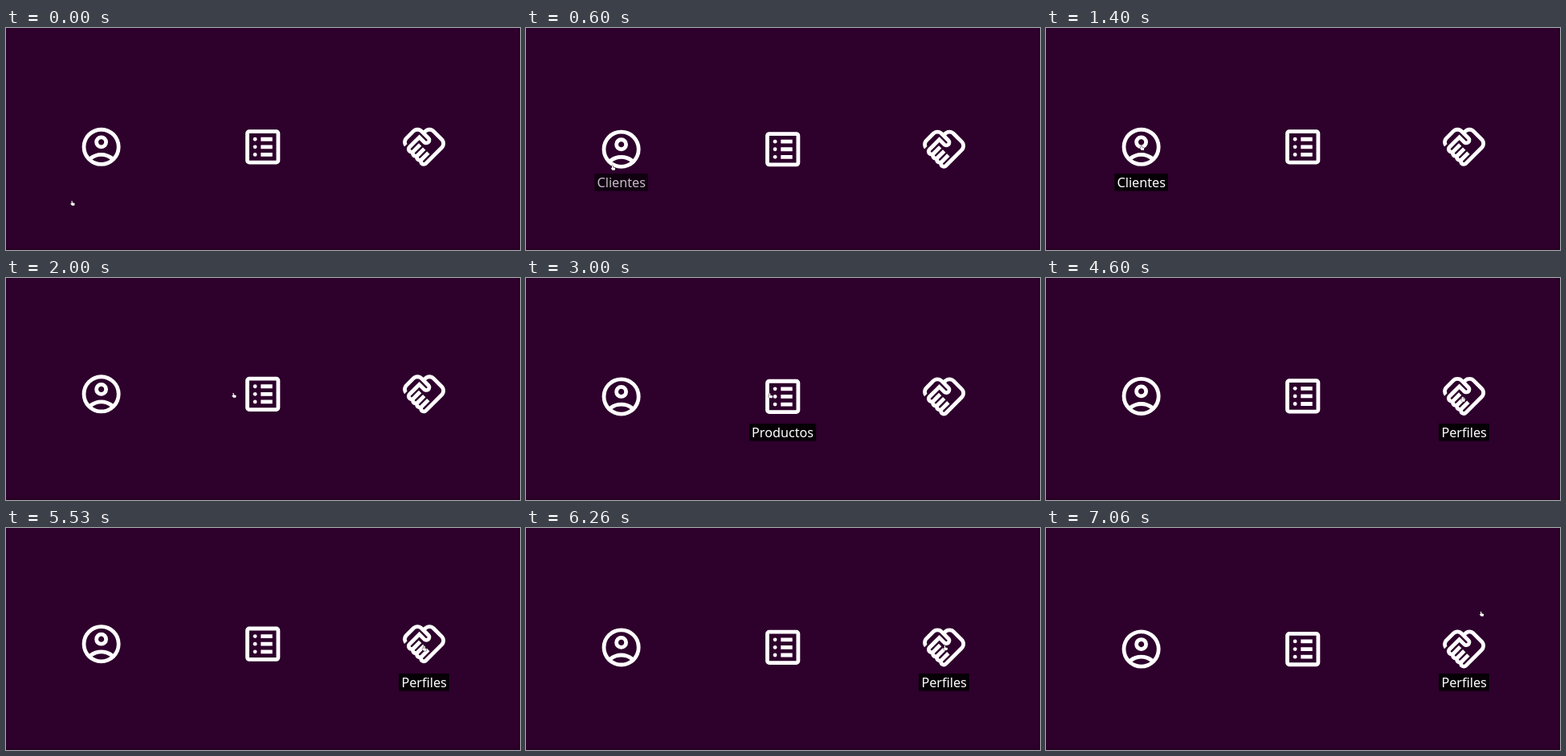
Animation of 640 by 276 pixels, one loop 7130 ms. Source, as an HTML page:

```html
<!DOCTYPE html>
<html lang="es">
<head>
<meta charset="utf-8">
<title>Menu</title>
<style>
  html, body { margin: 0; width: 100%; height: 100%; overflow: hidden; background: #2e002c; }
  svg { display: block; width: 640px; height: 276px; }
  text { font: 16.2px "Noto Sans", "Open Sans", sans-serif; fill: #fff; text-anchor: middle; }
</style>
</head>
<body>
<svg viewBox="0 0 640 276">
  <rect width="640" height="276" fill="#2e002c"/>
  <path d="M0 274.5H640M639.5 0V276" stroke="#22001f" stroke-width="2" opacity=".6"/>

  <!-- icons are drawn on a 960-unit grid centred on 480,-480 -->
  <g id="icons" fill="#fff">
    <g transform="translate(118.6) scale(.06) translate(-480 480)">
      <path d="M234-276q51-39 114-61.5T480-360q69 0 132 22.5T726-276q35-41 54.5-93T800-480q0-133-93.5-226.5T480-800q-133 0-226.5 93.5T160-480q0 59 19.5 111t54.5 93Zm246-164q-59 0-99.5-40.5T340-580q0-59 40.5-99.5T480-720q59 0 99.5 40.5T620-580q0 59-40.5 99.5T480-440Zm0 360q-83 0-156-31.5T197-197q-54-54-85.5-127T80-480q0-83 31.5-156T197-763q54-54 127-85.5T480-880q83 0 156 31.5T763-763q54 54 85.5 127T880-480q0 83-31.5 156T763-197q-54 54-127 85.5T480-80Zm0-80q53 0 100-15.5t86-44.5q-39-29-86-44.5T480-280q-53 0-100 15.5T294-220q39 29 86 44.5T480-160Zm0-360q26 0 43-17.5t17-42.5q0-26-17-43t-43-17q-25 0-42.5 17T420-580q0 25 17.5 42.5T480-520Z"/>
    </g>
    <g transform="translate(319.7) scale(.06) translate(-480 480)">
      <path d="M200-120q-33 0-56.5-23.5T120-200v-560q0-33 23.5-56.5T200-840h560q33 0 56.5 23.5T840-760v560q0 33-23.5 56.5T760-120H200Zm0-80h560v-560H200v560Z" fill-rule="evenodd"/>
      <path d="M440-280h240v-80H440zm0-160h240v-80H440zm0-160h240v-80H440z"/>
      <circle cx="320" cy="-640" r="40"/><circle cx="320" cy="-480" r="40"/><circle cx="320" cy="-320" r="40"/>
    </g>
    <g transform="translate(520.6) scale(.06) translate(-480 480)">
      <path d="M475-160q4 0 8-2t6-4l328-328q12-12 17.5-27t5.5-30q0-16-5.5-30.5T817-607L647-777q-11-12-25.5-17.5T591-800q-15 0-30 5.5T534-777l-11 11 74 75q15 14 22 32t7 38q0 42-28.5 70.5T527-522q-20 0-38.5-7T456-550l-75-74-175 175q-3 3-4.5 6.5T200-435q0 8 6 14.5t14 6.5q4 0 8-2t6-4l136-136 56 56-135 136q-3 3-4.5 6.5T285-350q0 8 6 14t14 6q4 0 8-2t6-4l136-135 56 56-135 136q-3 2-4.5 6t-1.5 8q0 8 6 14t14 6q4 0 7.5-1.5t6.5-4.5l136-135 56 56-136 136q-3 3-4.5 6.5T454-180q0 8 6.5 14t14.5 6Zm-1 80q-37 0-65.5-24.5T375-166q-34-5-57-28t-28-57q-34-5-56.5-28.5T206-336q-38-5-62-33t-24-66q0-20 7.5-38.5T149-506l232-231 131 131q2 3 6 4.5t8 1.5q9 0 15-5.5t6-14.5q0-4-1.5-8t-4.5-6L398-777q-11-12-25.5-17.5T342-800q-15 0-30 5.5T285-777L144-635q-9 9-15 21t-8 24q-2 12 0 24.5t8 23.5l-58 58q-17-23-25-50.5T40-590q2-28 14-54.5T87-692l141-141q24-23 53.5-35t60.5-12q31 0 60.5 12t52.5 35l11 11 11-11q24-23 53.5-35t60.5-12q31 0 60.5 12t52.5 35l169 169q23 23 35 53t12 61q0 31-12 60.5T873-437L545-110q-14 14-32.5 22T474-80Z"/>
    </g>
  </g>

  <g class="label"><rect x="85.3" y="181" width="66.7" height="21.6" fill="#060006"/><text x="118.7" y="198">Clientes</text></g>
  <g class="label"><rect x="278" y="181" width="83.2" height="21.6" fill="#060006"/><text x="319.6" y="198">Productos</text></g>
  <g class="label"><rect x="489" y="181" width="63" height="21.6" fill="#060006"/><text x="520.6" y="198">Perfiles</text></g>

  <path id="hand" d="M-1.5-3q.7-.5 1.2.2v2l2.4.6q.6.2.5.9l-.5 2.1h-3L-2.8.4q.3-.8 1.3-.1z"
    fill="#fff" stroke="#1a0018" stroke-width=".8" paint-order="stroke"/>
</svg>
<script>
const LOOP = 7130, STEP = 1000 / 15, FADE = 300;
const icons = document.getElementById('icons');
const hand = document.getElementById('hand');
const labels = document.querySelectorAll('.label');

// [fade-in start, fade-out start] for each label
const hovers = [[380, 1640], [2450, 3900], [4240, 7000]];

// cursor stops: time, x, y
const stops = [
  [0, 83, 218], [80, 83, 218], [600, 108.5, 174], [900, 116, 151], [1500, 120, 149],
  [2000, 284, 146], [3000, 304.5, 146.5], [3800, 314, 149],
  [4400, 519, 151], [5530, 521, 150], [6600, 523, 149], [7060, 543.5, 105], [LOOP, 543.5, 105]
];

const clamp = v => Math.max(0, Math.min(1, v));
const smooth = v => v * v * (3 - 2 * v);

function cursorAt(t) {
  const i = stops.findIndex(s => s[0] > t);
  const [t0, x0, y0] = stops[i - 1], [t1, x1, y1] = stops[i];
  const k = smooth((t - t0) / (t1 - t0));
  return [x0 + (x1 - x0) * k, y0 + (y1 - y0) * k];
}

function draw(now) {
  const t = Math.floor((now % LOOP) / STEP + 1e-6) * STEP;
  const y = 147.4 - 3.4 * Math.cos((t - 2230) / 3060 * 2 * Math.PI);
  icons.setAttribute('transform', `translate(0 ${y})`);
  labels.forEach((label, i) => {
    const [on, off] = hovers[i];
    label.style.opacity = clamp((t - on) / FADE) - clamp((t - off) / FADE);
  });
  hand.setAttribute('transform', `translate(${cursorAt(t)})`);
}

const start = performance.now();
function tick() {
  draw(performance.now() - start);
  requestAnimationFrame(tick);
}
tick();
</script>
</body>
</html>
```
